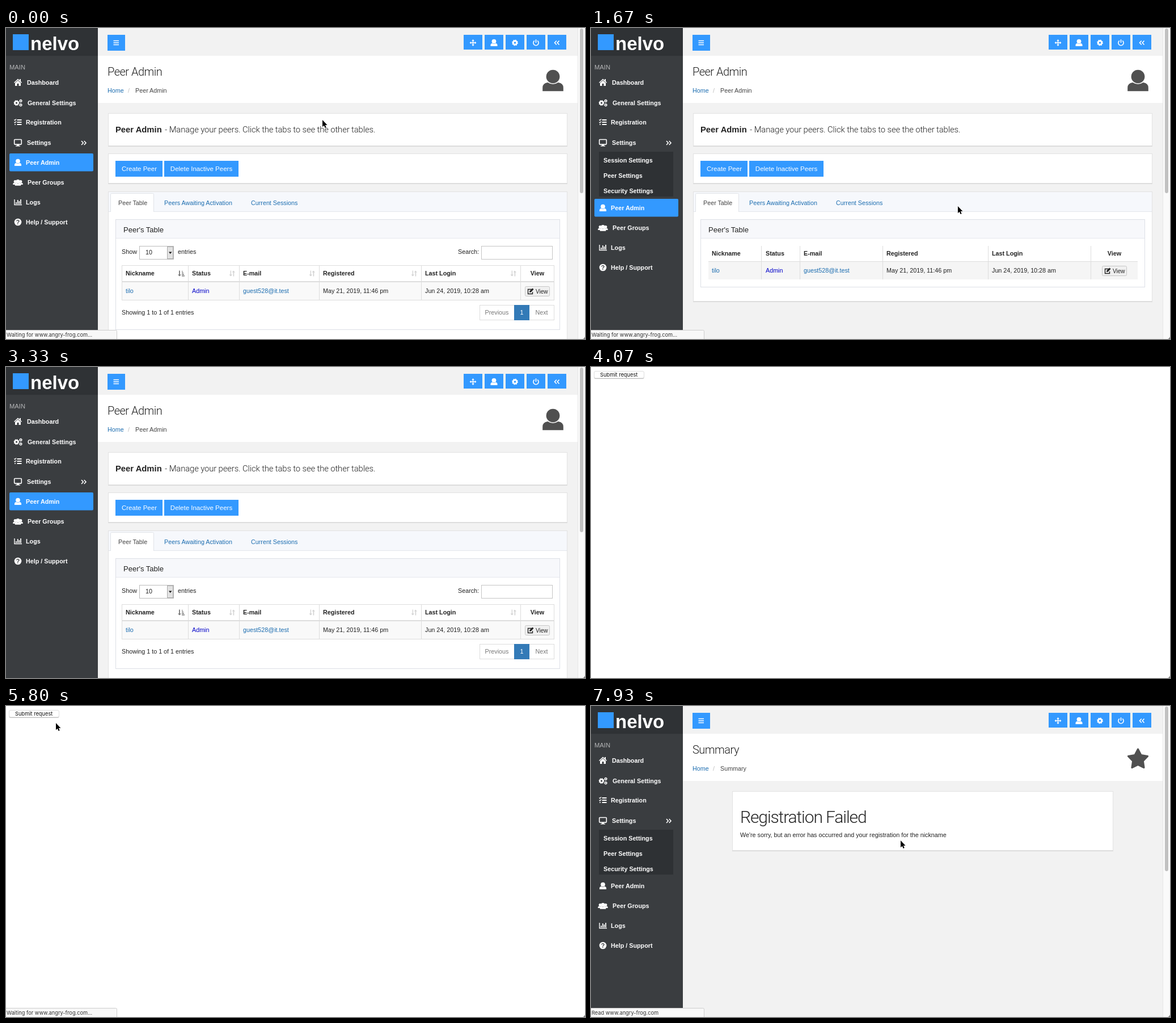
An HTML page for the animation above (8 s loop, 1021 by 548 pixels).

```html
<!DOCTYPE html>
<html lang="en">
<head>
<meta charset="utf-8">
<title>Peer Admin</title>
<style>
html, body { margin: 0; width: 100%; height: 100%; overflow: hidden; background: #fff; }
svg { display: block; position: absolute; left: 0; top: 0; }
text { font: 10.75px "Liberation Sans", Arial, sans-serif; fill: #222; white-space: pre; }
.b { font-weight: 700; }
.w { fill: #fff; }
.link { fill: #1c6db0; }
.mid { text-anchor: middle; }
.light { font-family: Roboto, "Liberation Sans", sans-serif; font-weight: 300; }
.ui { font-family: Inter, "Liberation Sans", sans-serif; font-size: 9.25px; }
</style>
</head>
<body>
<svg id="stage" width="1021" height="548" viewBox="0 0 1021 548"></svg>
<script>
const BLUE = '#3399ff', LINE = '#ddd';

const text = (x, y, s, cls = '', style = '') =>
  `<text x="${x}" y="${y}" class="${cls}" style="${style}">${s}</text>`;
const rect = (x, y, w, h, fill, more = '') =>
  `<rect x="${x}" y="${y}" width="${w}" height="${h}" fill="${fill}" ${more}/>`;
const box = (x, y, w, h, fill = '#fff', stroke = LINE, rx = 0) =>
  rect(x + .5, y + .5, w - 1, h - 1, fill, `stroke="${stroke}" rx="${rx}"`);
const path = (d, fill, more = '') => `<path d="${d}" fill="${fill}" ${more}/>`;
const line = (d, color, width = 1) => path(d, 'none', `stroke="${color}" stroke-width="${width}"`);
const at = (x, y, body, scale = 1) => `<g transform="translate(${x} ${y}) scale(${scale})">${body}</g>`;
const group = (id, body) => `<g id="${id}">${body}</g>`;
const card = (x, y, w, h) => rect(x, y + 1, w, h, '#d8d8d8') + box(x, y, w, h, '#fff', '#e2e2e2');

// Icons are centred on 0,0.
const person = c => `<circle cy="-2.4" r="3.9" fill="${c}"/>` +
  path('M-6 6V4Q-6 1.4-3 1Q0 3 3 1Q6 1.4 6 4V6Z', c);
const gear = (r, c) => `<circle r="${r * .62}" fill="none" stroke="${c}" stroke-width="${r * .55}"/>` +
  `<circle r="${r * .9}" fill="none" stroke="${c}" stroke-width="${r * .28}" stroke-dasharray="${r * .353}"/>`;
const chevrons = (dir, c) => line(`M${-4 * dir} -3.5L${-dir * .7} 0L${-4 * dir} 3.5M${dir * .7} -3.5L${4 * dir} 0L${dir * .7} 3.5`, c, 1.6);
const icons = {
  home: path('M-7 0L0-6.5L3-3.7V-6H5V-2L7 0L6 1L0-4.5L-6 1ZM-5 1L0-3.5L5 1V6H1.5V2H-1.5V6H-5Z', '#fff'),
  cogs: at(-2.5, 0, gear(4.7, '#fff')) + at(5, -3.5, gear(2.7, '#fff')) + at(5, 3.7, gear(2.7, '#fff')),
  tasks: line('M-1.5 -4H6.5M-1.5 0H6.5M-1.5 4H6.5', '#fff', 1.8) +
    line('M-6.5 -4.5l1.3 1.3l2.2-2.4M-6.5 -.3l1.3 1.3l2.2-2.4M-6 4h2', '#fff', 1.3),
  desktop: rect(-6.3, -5.5, 12.6, 8.6, 'none', 'stroke="#fff" stroke-width="1.6" rx="1"') +
    path('M-1.5 3H1.5L2 5.2H4V6.4H-4V5.2H-2Z', '#fff'),
  person: person('#fff'),
  people: at(-4.8, 0, person('#fff'), .65) + at(4.8, 0, person('#fff'), .65) + at(0, .5, person('#fff'), .87),
  chart: line('M-6 -5V4.5H7', '#fff', 1.4) + line('M-3 3V0M-.3 3V-4M2.4 3V-2M5 3V-5', '#fff', 1.7),
  help: '<circle r="6.3" fill="#fff"/>' + text(0, 3.7, '?', 'b mid', 'fill:#3a3d40;font-size:10.5px')
};
const arrows = line('M-4 0H4M0 -4V4', '#fff', 1.5) +
  path('M0-6L2.3-3.3H-2.3ZM0 6L2.3 3.3H-2.3ZM-6 0L-3.3-2.3V2.3ZM6 0L3.3-2.3V2.3Z', '#fff');
const power = line('M-2.7 -3.6A4.6 4.6 0 1 0 2.7 -3.6M0 -5.8V0', '#fff', 1.6);

const menuRow = ([icon, x, label, y]) => at(21, y - 4, icons[icon]) + text(x, y, label, 'b w');
const topMenu = [['home', 37, 'Dashboard', 100], ['cogs', 38, 'General Settings', 136],
  ['tasks', 35, 'Registration', 170], ['desktop', 37, 'Settings', 206]];
const lowMenu = [['person', 35, 'Peer Admin', 241], ['people', 38, 'Peer Groups', 276],
  ['chart', 35, 'Logs', 311], ['help', 35, 'Help / Support', 346]];

function frame() {
  const buttons = [arrows, person('#fff'), gear(5.2, '#fff'), power, chevrons(-1, '#fff')];
  return rect(0, 0, 1021, 548, '#f2f2f2') +
    rect(0, 0, 162, 548, '#3a3d40') + rect(0, 0, 162, 49, '#2f3235') +
    rect(12, 11, 28, 28, BLUE) + text(43, 39, 'nelvo', 'b w', 'font-size:33px') +
    text(6, 73, 'MAIN', '', 'fill:#b5b6b7;font-size:11.2px') +
    topMenu.map(menuRow).join('') + at(137, 202.5, chevrons(1, '#fff')) +
    group('submenu', rect(14, 218, 131, 79, '#2e3134') +
      ['Session', 'Peer', 'Security'].map((s, i) => text(22, 237 + i * 26.8, s + ' Settings', 'b w')).join('')) +
    group('lower', group('active', rect(6, 221, 148, 31.5, BLUE, 'rx="2"')) + lowMenu.map(menuRow).join('')) +
    rect(162, 49, 847, 83, '#fff') +
    rect(179, 12, 31, 28, BLUE) + line('M189.5 22.5H199M189.5 26H199M189.5 29.5H199', '#fff', 1.5) +
    buttons.map((b, i) => rect(807 + i * 37, 12, 33, 26, BLUE) + at(823.5 + i * 37, 26, b)).join('') +
    rect(1009, 0, 12, 548, '#fafafa') + rect(1008, 0, 1, 548, '#e6e6e6') +
    rect(1012, 1, 6, 290, '#c1c1c1', 'rx="3"');
}

const heading = title =>
  text(179, 84, title, 'light', 'font-size:20px;letter-spacing:-.025em') +
  text(179, 114, 'Home', 'link') + text(215, 114, '/', '', 'fill:#bbb') + text(228, 114, title, '', 'fill:#444');

const heads = ['Nickname', 'Status', 'E-mail', 'Registered', 'Last Login'];
const cells = ['tilo', 'Admin', 'guest528@it.test', 'May 21, 2019, 11:46 pm', 'Jun 24, 2019, 10:28 am'];

function rows(xs, headY, rowY, viewX) {
  const style = i => i === 1 ? 'fill:#0000c8' : '';
  return heads.map((h, i) => text(xs[i], headY, h, 'b')).join('') +
    cells.map((c, i) => text(xs[i], rowY, c, i === 0 || i === 2 ? 'link' : '', style(i))).join('') +
    text(viewX, headY, 'View', 'b mid') +
    box(viewX - 22, rowY - 12, 44, 18, '#f0f0f0', '#c8c8c8', 2) +
    at(viewX - 12, rowY - 3, line('M2 -3.5H-4.5V4.5H3.5V1', '#222', 1.4) + path('M-2 2L-1.5-.8L3.5-5.5L5.5-3.5L.8 1.5Z', '#222')) +
    text(viewX - 3, rowY + 1, 'View', '', 'font-size:10px');
}

const sortIcon = x => at(x, 432.5,
  path('M-3.3-5V2H-5.5L-2.7 5L0 2H-2V-5ZM2-5L-.2-2H1.6V5H3.2V-2H5Z', '#d2d2d2'));
const sortedIcon = at(309, 432.5, path('M-4-5V2H-6L-3 5L0 2H-2.2V-5Z', '#777') +
  line('M1 -3.8H2.5M1 -1H3.8M1 1.8H5M1 4.3H6', '#777', 1.6));

function shell(id, bottom, innerBottom, body) {
  return group(id, card(180, 288, 810, bottom - 288) +
    rect(181, 289, 808, 35, '#f6f8fc') + line('M181 323.5H989', '#e3e6ec') +
    path('M184.5 324V293.5Q184.5 291.5 186.5 291.5H258.5Q260.5 291.5 260.5 293.5V324', '#fff', 'stroke="#e0e3e8"') +
    text(198, 312, 'Peer Table', '', 'fill:#444') + text(279, 312, 'Peers Awaiting Activation', 'link') +
    text(432, 312, 'Current Sessions', 'link') +
    box(193, 337, 784, innerBottom - 337, '#fff', '#dcdfe6') + rect(194, 338, 782, 33, '#f7f8fb') +
    line('M194 370.5H976', '#e6e8ee') +
    text(207, 360, "Peer's Table", '', 'font-size:13px') + body);
}

function fullTable() {
  return shell('full', 562, 532,
    text(204, 398, 'Show') + box(235, 384, 61, 24, '#fff', '#bbb') +
    box(284, 385, 11, 22, '#e2e2e2', '#aaa') + path('M287 394.5H292.5L289.7 398Z', '#111') +
    text(246, 399, '10') + text(303, 398, 'entries') +
    text(797, 398, 'Search:') + box(838, 384, 126, 24, '#fff', '#c5c5c5') +
    rect(205, 447, 761, 33, '#f9f9f9') + box(204, 418, 763, 62, 'none') +
    line('M321.5 418V480M411.5 418V480M552.5 418V480M732.5 418V480M907.5 418V480', LINE) +
    line('M204 447H967', LINE, 2) + sortedIcon + [399, 540, 720, 895].map(sortIcon).join('') +
    rows([211, 328, 418, 559, 739], 436, 467, 937) +
    text(204, 505, 'Showing 1 to 1 of 1 entries') +
    box(835, 488, 62, 27) + box(922, 488, 45, 27) + rect(896, 488, 27, 27, '#337ab7') +
    text(865.5, 505, 'Previous', 'mid', 'fill:#777') + text(909.5, 505, '1', 'mid w') + text(944.5, 505, 'Next', 'mid', 'fill:#777'));
}

function plainTable() {
  return shell('plain', 482, 457,
    rect(207, 412, 757, 31, '#f5f5f5') +
    line('M300.5 384V443M368.5 384V443M514.5 384V443M700.5 384V443M881.5 384V443M207 411.5H964', LINE) +
    rows([213, 308, 375, 521, 707], 401, 431, 923));
}

function adminPage() {
  return group('admin', heading('Peer Admin') + at(964.5, 93, person('#505050'), 3.05) +
    card(180, 150, 810, 58) +
    text(193, 184, 'Peer Admin', 'b', 'font-size:14.8px') +
    text(280, 184, '- Manage your peers. Click the tabs to see the other tables.', 'light', 'font-size:14.8px;letter-spacing:-.007em') +
    card(180, 221, 810, 53) + rect(193, 234, 83, 28, BLUE) + rect(279, 234, 131, 28, BLUE) +
    text(235, 252, 'Create Peer', 'w mid', 'font-size:11.5px') +
    text(344.5, 252, 'Delete Inactive Peers', 'w mid', 'font-size:11.5px') +
    fullTable() + plainTable());
}

function star(r) {
  const pts = Array.from({ length: 10 }, (_, i) => {
    const a = i * Math.PI / 5 - Math.PI / 2, d = i % 2 ? r * .52 : r;
    return (d * Math.cos(a)).toFixed(2) + ' ' + (d * Math.sin(a)).toFixed(2);
  });
  return path('M' + pts.join('L') + 'Z', '#505050', 'stroke="#505050" stroke-width="3" stroke-linejoin="round"');
}

const summaryPage = () => group('summary', heading('Summary') + at(964.5, 94, star(18)) +
  card(249, 150, 672, 105) +
  text(263, 206, 'Registration Failed', 'light', 'font-size:30px;letter-spacing:-.037em') +
  text(263, 231, "We're sorry, but an error has occurred and your registration for the nickname"));

const requestPage = () => group('request', rect(0, 0, 1021, 548, '#fff') +
  rect(5.5, 8, 88, 13, '#c4c4c4', 'rx="2.5"') + box(5, 7, 89, 13, '#fff', '#dedede', 2.5) +
  text(49.2, 17, 'Submit request', 'ui mid', 'fill:#111'));

const stage = document.getElementById('stage');
stage.innerHTML = group('site', frame() + adminPage() + summaryPage()) + requestPage() +
  path('M1021 544V548H1017Q1020 547 1021 544Z', '#777') +
  group('status', rect(-2.5, 532.5, 199, 18, '#f8f8f8', 'id="bar" stroke="#cdcdcd" rx="2"') +
    text(1, 544, '', 'ui', 'fill:#333')) +
  group('cursor', path('M0 0V12.2L2.8 9.7L4.7 14L6.7 13.1L4.8 8.9H8.5Z', '#000', 'stroke="#fff" stroke-width="1" paint-order="stroke"'));

const $ = id => document.getElementById(id);
const show = (id, on) => { $(id).style.display = on ? '' : 'none'; };
const HOST = 'www.angry-frog.com';
const WAIT = `Waiting for ${HOST}...`, MOVE = `Transferring data from ${HOST}...`, READ = `Read ${HOST}`;

// start, page, status text, status width
const steps = [
  [0, 'full', WAIT, 196], [400, 'plain', MOVE, 200], [1000, 'plain', WAIT, 200],
  [2270, 'plain', READ, 200], [2800, 'full', '', 0], [3930, 'request', '', 0],
  [4800, 'request', WAIT, 196], [6400, 'summary', MOVE, 200], [7130, 'summary', READ, 200]
];
// time, x, y of the pointer tip
const track = [
  [0, 558, 162], [70, 558, 162], [200, 560, 163], [400, 560, 163], [1200, 628, 282],
  [1670, 647, 314], [2070, 612, 352], [2600, 458, 447], [2900, 425, 560],
  [4200, 205, -20], [4330, 196, 0], [4600, 92, 10], [4870, 80, 12], [5070, 80, 12],
  [5500, 86, 26], [5800, 88, 30], [6470, 88, 30], [6700, 260, 105], [7200, 600, 246],
  [7600, 560, 250], [7930, 546, 237], [8000, 546, 237]
];

function pointer(t) {
  const i = track.findIndex(k => k[0] > t), a = track[i - 1], b = track[i];
  const p = (t - a[0]) / (b[0] - a[0]);
  return [a[1] + (b[1] - a[1]) * p, a[2] + (b[2] - a[2]) * p];
}

function draw(t) {
  const [, page, message, width] = steps.filter(s => s[0] <= t).pop();
  const open = page === 'plain' || page === 'summary', admin = page === 'full' || page === 'plain';
  show('site', page !== 'request');
  show('request', page === 'request');
  show('admin', admin);
  show('active', admin);
  show('full', page === 'full');
  show('plain', page === 'plain');
  show('summary', page === 'summary');
  show('submenu', open);
  $('lower').setAttribute('transform', `translate(0 ${open ? 80 : 0})`);
  show('status', width > 0);
  $('bar').setAttribute('width', width + 2);
  $('status').lastChild.textContent = message;
  show('cursor', t < 2900 || t >= 4200);
  $('cursor').setAttribute('transform', `translate(${pointer(t).join(' ')})`);
}

const start = performance.now();
function tick() {
  draw((performance.now() - start) % 8000);
  requestAnimationFrame(tick);
}
tick();
</script>
</body>
</html>
```
